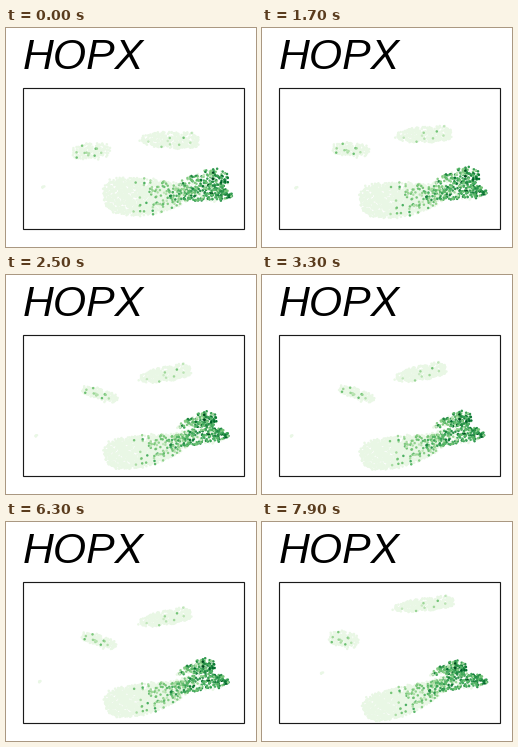
Write a matplotlib script that moves like this. It is 250 px wide and 219 px high and loops after 8000 ms.

```python
import numpy as np
import matplotlib.pyplot as plt
from matplotlib.animation import FuncAnimation
from matplotlib.patches import Rectangle

W, H, DPI = 250, 219, 100
STEP, FRAMES = 100, 80
MOVES = (350, 5350)      # start of each transition, ms
MOVE_TIME = 2950
BASE = 0.1               # colour level of cells without expression

rng = np.random.default_rng(8)
px = 72 / DPI


def outline(u, skew):
    """Relative half-width of a rounded blob, wider to the right if skew > 0."""
    round_end = (1 - np.abs(2 * u - 1) ** 2.6) ** (1 / 2.6)
    return round_end * (1 + skew * (u - 0.5))


def place(pose, u, v, skew):
    """Map length u in 0..1 and side v in -1..1 to a bowed blob."""
    x0, y0, x1, y1, bow, half = pose
    chord = np.array([x1 - x0, y1 - y0])
    normal = np.array([-chord[1], chord[0]]) / np.hypot(*chord)
    side = bow * 4 * u * (1 - u) + half * v * outline(u, skew)
    return np.array([x0, y0]) + np.outer(u, chord) + np.outer(side, normal)


def cluster(count, poses, skew=0, share=(0, 0), level=(0.4, 0.4), spread=0.1):
    """Cells in three poses; share and level run linearly along the length."""
    grid = np.linspace(0, 1, 400)
    weight = outline(grid, skew)
    u = rng.choice(grid, count, p=weight / weight.sum())
    v = rng.uniform(-1, 1, count)
    noise = rng.normal(0, 0.5, (count, 2))
    places = np.array([place(p, u, v, skew) + noise for p in poses])
    value = np.clip(rng.normal(level[0] + (level[1] - level[0]) * u, spread),
                    0.22, 0.97)
    value[rng.random(count) > share[0] + (share[1] - share[0]) * u] = BASE
    return places, value


# Pose: left end, right end, downward bow, half-width.
speck = cluster(4, [(35, 158.5, 38, 158.5, 0, 0.5),
                    (28, 160.5, 30, 160.5, 0, 0.5),
                    (58, 150.5, 61, 150.5, 0, 0.5)])
small = cluster(200, [(66, 125, 104, 122, 0, 8),
                      (77, 113, 112, 125, 0, 5),
                      (67, 115, 96, 120, 0, 8)],
                share=(0.05, 0.05), level=(0.43, 0.43))
upper = cluster(380, [(134, 111, 193, 113, 0, 8.5),
                      (133, 103, 184, 93, 0, 7.5),
                      (131, 86, 192, 79, 0, 6.5)],
                skew=0.4, share=(0.02, 0.02), level=(0.32, 0.32))
body = cluster(1350, [(97, 166, 186, 164, 4, 17.5),
                      (98, 181, 184, 164, 3.5, 14.5),
                      (101, 188, 184, 161, 4, 13.5)],
               skew=-0.6, share=(-0.09, 0.25), level=(0.36, 0.5))
low_lobe = cluster(310, [(160, 165, 226, 167, 0, 7),
                         (160, 168, 222, 159, -2, 8),
                         (163, 167, 225, 159, -3, 7.5)],
                   share=(0.2, 0.95), level=(0.45, 0.68), spread=0.14)
high_lobe = cluster(170, [(170, 157, 222, 151, -3, 7.5),
                          (171, 152, 209, 143, -2, 6),
                          (168, 153, 204, 146, -3, 5.5)],
                    skew=1.5, share=(0.6, 0.97), level=(0.45, 0.72), spread=0.15)

groups = (speck, small, upper, body, low_lobe, high_lobe)
poses = np.concatenate([g[0] for g in groups], axis=1)
values = np.concatenate([g[1] for g in groups])
order = np.argsort(values > BASE, kind="stable")
poses, values = poses[:, order], values[order]


def ease(x):
    x = min(max(x, 0), 1)
    return 4 * x ** 3 if x < 0.5 else 1 - 4 * (1 - x) ** 3


fig = plt.figure(figsize=(W / DPI, H / DPI), dpi=DPI, facecolor="white")
ax = fig.add_axes([0, 0, 1, 1])
ax.set_xlim(0, W)
ax.set_ylim(H, 0)
ax.axis("off")
ax.text(16.7, 41.2, "HOPX", family="Liberation Sans", style="italic",
        size=42.7 * px, va="baseline", ha="left")
ax.add_patch(Rectangle((17.5, 60.5), 221, 141, fill=False, ec="#1a1a1a",
                       lw=1.15 * px, snap=False))
cells = ax.scatter(*poses[0].T, s=(2.5 * px) ** 2, c=values, cmap="Greens",
                   vmin=0, vmax=1, linewidths=0)


def update(i):
    a, b = (ease((i * STEP - start) / MOVE_TIME) for start in MOVES)
    cells.set_offsets(poses[0] + a * (poses[1] - poses[0])
                      + b * (poses[2] - poses[1]))
    return cells,


anim = FuncAnimation(fig, update, frames=FRAMES, interval=STEP,
                     repeat=True, repeat_delay=0)
plt.show()
```
